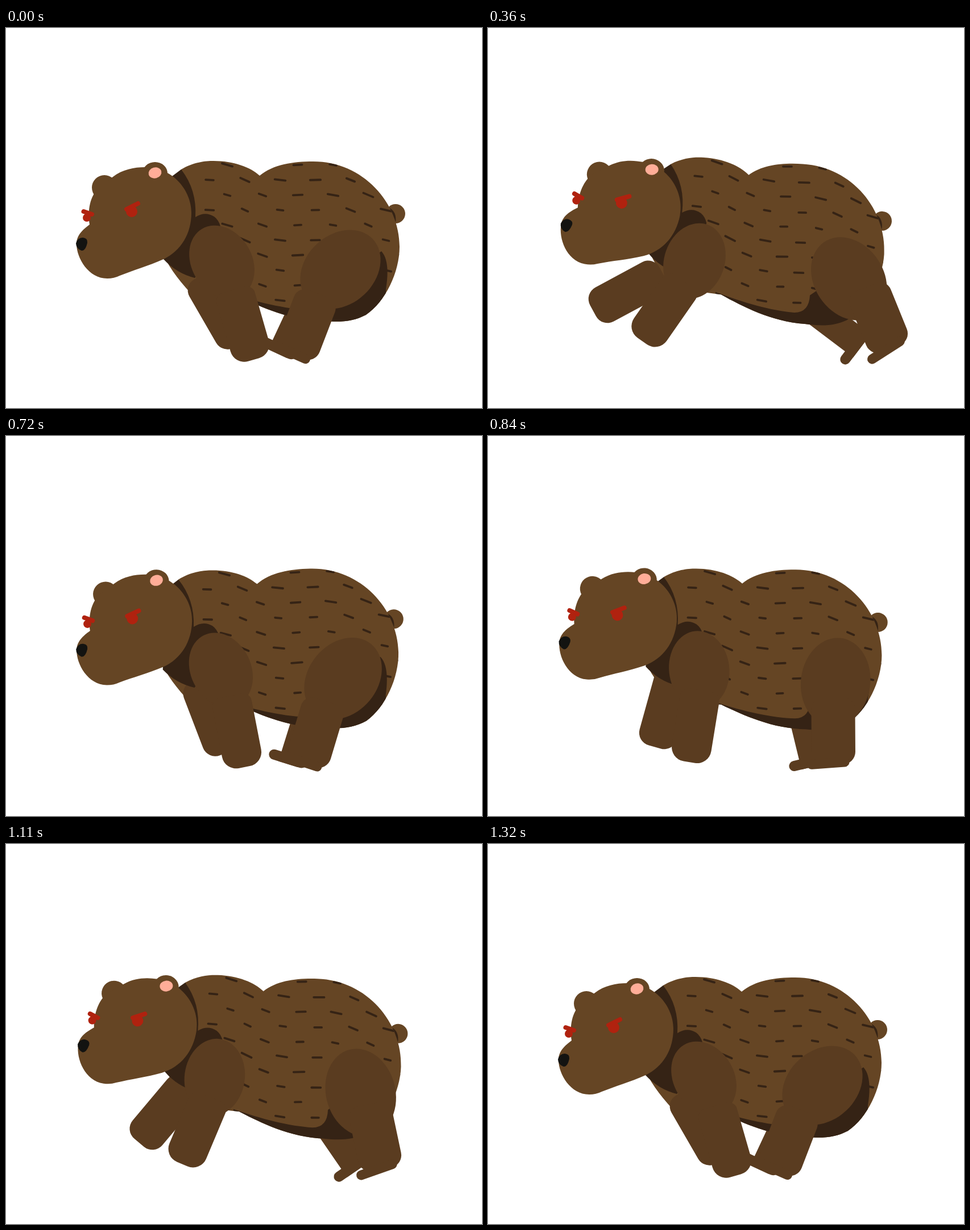
An HTML page with a canvas for the animation above (1.35 s loop, 837 px wide and 669 px high).

```html
<!DOCTYPE html>
<html lang="en">
<head>
<meta charset="utf-8">
<title>Running bear</title>
<style>
  html, body { margin: 0; width: 100%; height: 100%; overflow: hidden; background: #fff; }
  canvas { display: block; }
</style>
</head>
<body>
<canvas id="stage" width="837" height="669"></canvas>
<script>
const ctx = document.getElementById('stage').getContext('2d');
const LOOP = 1350, STEP = 30;
const FUR = '#654524', LIMB = '#5a3c20', SHADE = '#352315';
const RED = '#b0220f', PINK = '#ffad98', BLACK = '#131311';

// Linear keys: stride goes from gathered (0) to stretched (1), tilt is in degrees.
const TIMES = [0, 330, 690, 1020, 1320];
const STRIDE = [0, 1, 0, 1, 0];
const TILT = [0, 3.85, -1.65, 2.6, 0];

const TORSO = new Path2D(`M446 260 C470 240 505 235 540 235 C628 235 692 308 692 385
  C692 430 667 482 633 505 C610 517 590 518 560 516 C500 515 450 492 410 473
  L325 467 C300 440 283 415 275 395 L290 300 L308 249 C330 236 350 234 365 234
  C400 234 430 245 446 260Z`);
const BELLY = new Path2D(`M400 469 C450 485 500 496 540 497 Q566 496 566 465
  L660 393 Q676 410 668 460 V530 H400Z`);
const NECK = new Path2D(`M308 249 Q336 285 333 333 Q350 322 366 332 Q374 338 377 349
  L365 400 L332 440 Q300 432 277 407 L285 300 L292 261Z`);
const HEAD = new Path2D(`M188 262 C205 249 225 245 245 245 C292 245 326 285 326 325
  C326 362 308 392 277 407 C250 419 225 426 200 436 Q190 441 178 441
  C145 441 124 405 124 380 C124 365 135 355 147 346 C143 320 148 297 162 282Z`);
const NOSE = new Path2D('M123 379 Q126 369 135 369 Q144 370 143 378 Q140 392 133 392 Q123 388 123 379Z');

const rad = deg => deg * Math.PI / 180;

function keyed(values, t) {
  const last = TIMES.length - 1;
  if (t >= TIMES[last]) return values[last];
  const i = TIMES.findIndex(time => time > t) - 1;
  return values[i] + (values[i + 1] - values[i]) * (t - TIMES[i]) / (TIMES[i + 1] - TIMES[i]);
}

function fill(path, color) {
  ctx.fillStyle = color;
  ctx.fill(path);
}

function oval(x, y, rx, ry, color, turn = 0) {
  ctx.beginPath();
  ctx.ellipse(x, y, rx, ry, rad(turn), 0, Math.PI * 2);
  ctx.fillStyle = color;
  ctx.fill();
}

function slab(x, y, w, h, radii) {
  ctx.beginPath();
  ctx.roundRect(x, y, w, h, radii);
  ctx.fillStyle = LIMB;
  ctx.fill();
}

function bar(x1, y1, x2, y2, width, color) {
  ctx.beginPath();
  ctx.moveTo(x1, y1);
  ctx.lineTo(x2, y2);
  ctx.lineWidth = width;
  ctx.strokeStyle = color;
  ctx.stroke();
}

function turned(x, y, degrees, draw) {
  ctx.save();
  ctx.translate(x, y);
  ctx.rotate(rad(degrees));
  draw();
  ctx.restore();
}

// Rotates a part around a joint while keeping stage coordinates.
function around(x, y, degrees, draw) {
  turned(x, y, degrees, () => {
    ctx.translate(-x, -y);
    draw();
  });
}

function farHind(p) {
  const x = 455 + 178 * p + 12 * p * p, y = 553 + 90 * p - 62 * p * p;
  turned(x, y, 25 - 85 * p, () => {
    bar(0, 0, 45, 0, 18, LIMB);
    slab(11, -115, 52, 124, [20, 20, 14, 0]);
  });
}

function farFront(p) {
  const x = 407 - 256 * p + 22 * p * p, y = 551 + 16 * p - 85 * p * p;
  turned(x, y, 100 * p - 30, () => slab(-34, -132, 68, 139, [22, 22, 23, 23]));
}

function nearHind(p) {
  const x = 508 + 218 * p, y = 575 + 18 * p - 34 * p * p;
  oval(588 + 51 * p, 425 + 18 * p, 61, 78, LIMB, 47 - 88 * p);
  turned(x, y, 21 - 47 * p, () => slab(-38, -115, 77, 117, [20, 20, 22, 22]));
  turned(x, y, 25 - 62 * p, () => bar(-38, 0, 20, -1, 17, LIMB));
}

function nearFront(p) {
  const x = 435 - 178 * p, y = 583 - 8 * p - 30 * p * p;
  oval(379.5 - 18 * p, 412 - 2 * p, 53, 68, LIMB, 55 * p - 31);
  turned(x, y, 55.5 * p - 16, () => slab(-35, -127, 70, 128, [15, 15, 25, 25]));
}

// Staggered rows whose lean follows the two humps of the back.
function hairs() {
  for (let row = 0; row < 10; row++) {
    for (let col = 0; col < 6; col++) {
      const x = 358 + 62 * col + (row % 2 ? 0 : 31), y = 241 + 26.5 * row;
      const lean = 10 + 14 * Math.cos((x - 425) / 200 * 2 * Math.PI);
      const half = 7.5 + 2 * Math.sin(x + y);
      turned(x, y, lean, () => bar(-half, 0, half, 0, 3.8, SHADE));
    }
  }
}

function torso() {
  oval(685, 327, 17, 17, FUR);
  fill(new Path2D('M671 315 Q688 322 685 343Z'), SHADE);
  fill(TORSO, FUR);
  ctx.save();
  ctx.clip(TORSO);
  hairs();
  fill(BELLY, SHADE);
  ctx.restore();
}

function eye(x, y, r, browX1, browY1, browX2, browY2) {
  bar(browX1, browY1, browX2, browY2, 8, RED);
  oval(x, y, r, r, RED);
}

function head() {
  oval(173, 281, 22, 22, FUR);
  oval(262, 256, 22, 20, FUR);
  fill(HEAD, FUR);
  oval(262, 255, 11.5, 9.5, PINK, -15);
  eye(142, 334, 7, 136.5, 323, 151, 328);
  eye(221, 323, 10, 212, 319, 232, 309);
  fill(NOSE, BLACK);
}

function draw(t) {
  const p = keyed(STRIDE, t), tilt = keyed(TILT, t);
  ctx.fillStyle = '#fff';
  ctx.fillRect(0, 0, 837, 669);
  ctx.lineCap = 'round';
  farHind(p);
  around(472, 469, tilt, torso);
  farFront(p);
  around(472, 469, tilt, () => fill(NECK, SHADE));
  around(305, 387, 12.1 * p, head);
  nearHind(p);
  nearFront(p);
}

const start = performance.now();
function tick() {
  const t = (performance.now() - start) % LOOP;
  draw(Math.floor(t / STEP) * STEP);
  requestAnimationFrame(tick);
}
tick();
</script>
</body>
</html>
```
